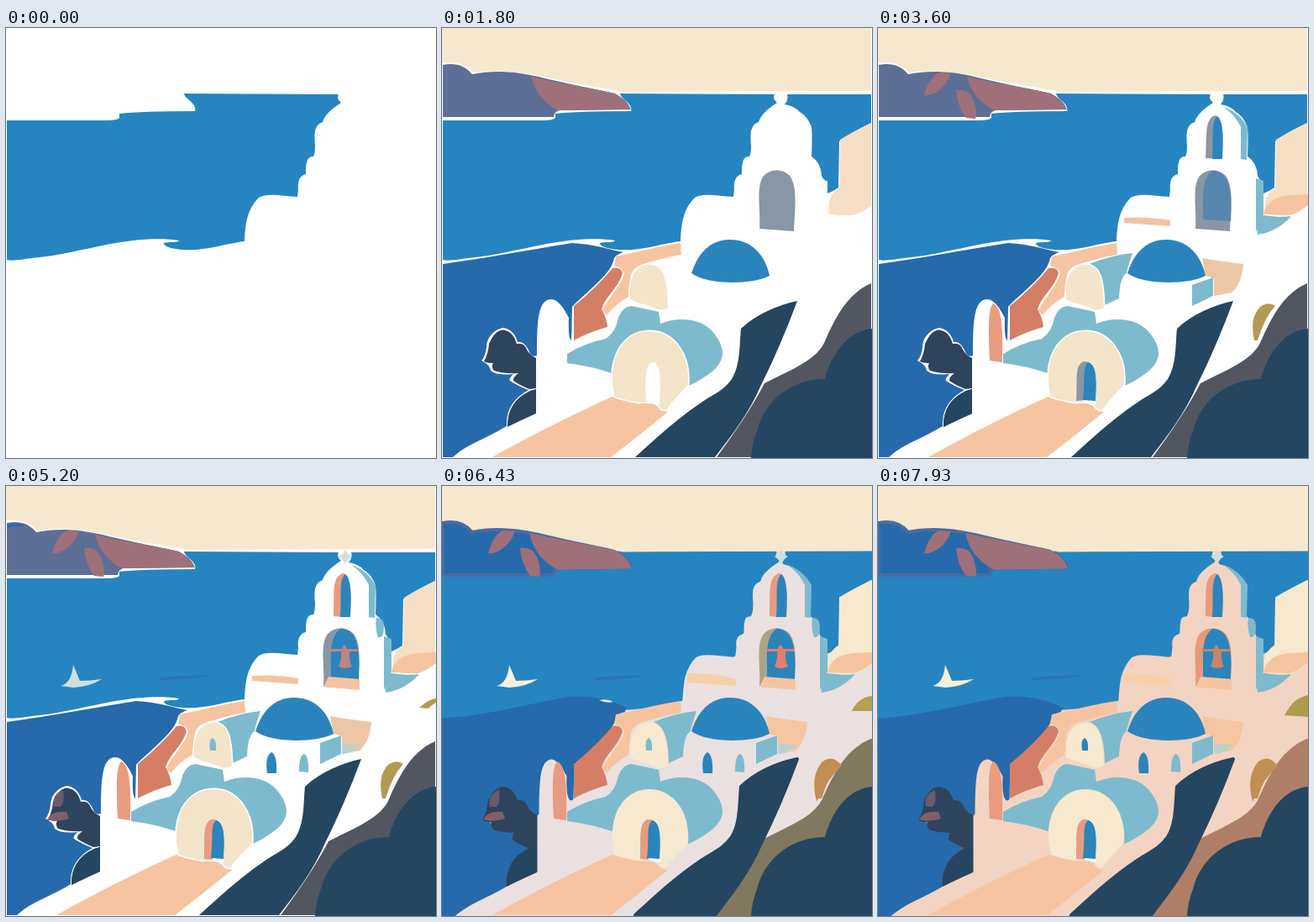
An HTML page without scripts that plays this animation: 512x512 px, repeating every 8 s.

```html
<!DOCTYPE html>
<html lang="en">
<head>
<meta charset="utf-8">
<title>Island village</title>
<style>
/* --t is the clock in ms; a piece shows from --s on, and swells by --w from --g on */
@property --t { syntax: "<number>"; inherits: true; initial-value: 0; }
@keyframes clock { to { --t: 8000; } }
html, body { margin: 0; width: 100%; height: 100%; overflow: hidden; background: #fff; }
svg { display: block; width: 100vw; height: 100vh; animation: clock 8s linear infinite; }
path, rect {
  fill: currentColor; stroke: currentColor; stroke-width: 0; stroke-linejoin: round;
  opacity: calc(var(--t) - var(--s, -9) + 1);
  animation: 8s step-end infinite;
}
.grow { stroke-width: calc(clamp(0, var(--t) - var(--g) + 1, 1) * var(--w, 5px)); }
.cut { stroke: #fff; stroke-width: 3px; stroke-opacity: calc(5330 - var(--t)); paint-order: stroke; }

.sea { color: #2685c0; }
.deep { color: #266aab; }
.blue { color: #2b84bc; }
.navy { color: #254660; }
.teal { color: #7ebace; }
.peach { color: #f6c4a0; }
.coral { color: #e99b80; }
.clay { color: #d47f65; }
.mauve { color: #9f7079; }

.base { animation-name: base; }
.isle { stroke: #4b6ba0; animation-name: isle; }
.rock { animation-name: rock; }
.wall { animation-name: wall; }
.cream { animation-name: cream; }
.arch { animation-name: arch; }
.glass { animation-name: glass; }
.ledge { animation-name: ledge; }
.shade { animation-name: shade; }
.shrub { animation-name: shrub; }
.bell { animation-name: bell; }
.sail { animation-name: sail; }
.pane { animation-name: pane; }
@keyframes base { 0% { color: #fff; } 75.375% { color: #eae0e0; } 89.125% { color: #f3d4c2; } }
@keyframes isle { 0% { color: #5d6f96; } 70.375% { color: #266aab; } }
@keyframes rock { 0% { color: #515661; } 76.625% { color: #80795f; } 90.375% { color: #ae7f66; } }
@keyframes wall { 0% { color: #f6dfc4; } 71.625% { color: #f6e9cd; } }
@keyframes cream { 0% { color: #f3e4ca; } 72.875% { color: #f6e9cf; } }
@keyframes arch { 0% { color: #8996a3; } 77.875% { color: #aea38a; } 92.875% { color: #e59a78; } }
@keyframes glass { 0% { color: #5686ae; } 62.5% { color: #2b84bc; } }
@keyframes ledge { 0% { color: #f5c3a1; } 74.125% { color: #f7d0a8; } }
@keyframes shade { 0% { color: #edc6a6; } 79.125% { color: #f5c6a0; } }
@keyframes shrub { 0% { color: #b19a54; } 80.375% { color: #c18f54; } }
@keyframes bell { 0% { color: #c08380; } 80.375% { color: #e27f70; } 94.125% { color: #c58567; } }
@keyframes sail { 0% { color: #d0e0de; } 77.875% { color: #f6f0dc; } }
@keyframes pane { 0% { color: #7ebace; } 95.375% { color: #2b84bc; } }
</style>
</head>
<body>
<svg viewBox="0 0 512 512" preserveAspectRatio="none">
  <rect class="base" width="512" height="512"/>

  <!-- water and sky -->
  <path class="sea grow" style="--g:5430" d="M1 110H120Q133 110 135 107V102Q160 99 225 99C228 90 212 84 212 78L396 79Q393 84 399 89Q380 101 377 112C366 116 367 128 368 140Q368 150 366 153C358 153 357 160 357 174C349 176 347 184 348 192L347 201C330 200 310 196 301 202C286 217 285 235 284 254C265 256 235 266 210 264C195 263 187 259 188 256C195 254 205 256 206 253C185 249 150 252 125 257C90 264 60 271 40 273C20 275 8 278 1 276Z"/>
  <path class="sea grow" style="--s:700;--g:5430" d="M411 79H511V113Q480 128 473 135L472 190Q465 195 459 197V182Q455 183 452 176Q451 160 440 153Q441 130 440 118Q435 105 426 100Q420 93 408 91Q413 85 411 79Z"/>
  <path class="grow" color="#f6e8ce" style="--s:100;--g:5330" d="M0 0H511V75L215 76C205 73 150 65 115 57C85 51 60 50 37 53C30 45 20 41 10 41H0Z"/>
  <path class="deep grow" style="--s:300;--g:5530" d="M1 281C50 274 100 265 155 256C180 257 200 264 216 267Q207 270 205 274C202 290 185 303 173 315Q158 328 155 332L154 372Q150 370 151 345C146 335 138 322 129 323C115 325 113 345 113 390Q108 392 105 388Q99 372 90 374C87 362 78 357 72 357C60 360 53 370 53 380Q52 390 47 396Q57 401 58 408Q65 414 85 412Q79 418 81 420Q90 426 103 431C85 441 76 455 77 474C55 488 30 495 13 511H1Z"/>
  <path class="deep" style="--s:5530" d="M0 277C60 272 105 259 150 251Q190 248 222 265L205 269Q150 258 0 284Z"/>
  <path color="#f0e9e2" style="--s:5530;opacity:calc((var(--t) - 5529) * (6530 - var(--t)))" d="M187 255Q197 253 204 257Q196 259 187 255Z"/>

  <!-- far island -->
  <path class="isle grow" style="--s:200;--g:5630;--w:4px" d="M1 44C15 41 27 44 36 55C60 50 85 51 115 58C150 67 190 74 205 78Q220 84 225 97L140 98Q134 99 133 106H1Z"/>
  <path class="deep" style="--s:4500" d="M2 46Q15 43 24 48Q12 47 2 50Z"/>
  <path class="mauve grow" style="--s:1000;--g:5630;--w:3px" d="M106 58C140 66 180 72 206 78Q220 86 224 97L138 98Q113 85 106 58Z"/>
  <path class="mauve" style="--s:2800" d="M55 80Q60 60 72 53L87 54Q82 68 70 76Q62 81 55 80Z"/>
  <path class="mauve" style="--s:2900" d="M93 74Q108 72 113 85Q119 100 116 108L105 107Q95 95 93 74Z"/>

  <!-- boat -->
  <path class="sail" style="--s:4600" d="M65 238Q78 235 80 213Q84 222 88 232Q100 232 114 230Q100 239 80 240Z"/>
  <path color="#2a73b1" style="--s:4700" d="M180 229Q205 225 242 226Q215 231 184 231Z"/>

  <!-- slope and rocks -->
  <path class="rock grow" style="--s:500;--g:6130;--w:6px" d="M511 304C485 315 470 340 455 375C445 395 420 405 384 423C370 450 350 480 327 511H511Z"/>
  <path class="navy grow" style="--s:400;--g:5930;--w:4px" d="M423 325C400 330 375 340 356 358C354 375 356 400 345 418C335 432 325 435 310 445C280 465 255 488 230 511H325C345 485 365 460 380 425C395 395 410 360 423 325Z"/>
  <path class="navy" style="--s:600" d="M512 358C485 360 465 385 456 418C420 418 385 440 375 480Q369 495 368 512H512Z"/>
  <path class="shrub" style="--s:3600" d="M448 372Q442 345 455 332Q465 325 473 331Q460 345 452 372Z"/>
  <path color="#c18f54" style="--s:6430" d="M446 376Q438 345 453 328Q465 319 476 333Q458 350 446 376Z"/>
  <path color="#b19a54" style="--s:5200" d="M492 264Q505 253 512 253V258Q505 262 503 265Z"/>
  <path color="#b3a052" style="--s:6330" d="M488 268Q495 252 512 250V268Z"/>
  <path color="#ad9c4e" style="--s:7530" d="M484 273Q495 252 512 249V275Z"/>

  <!-- bush -->
  <path color="#2e445d" class="grow" style="--s:1100;--g:6230;--w:3px" d="M50 397Q55 388 56 376C62 362 70 358 75 360C84 362 87 370 89 376Q98 374 101 383Q105 390 112 393V429L104 430Q90 424 85 420Q84 416 91 411Q75 412 62 408Q58 403 61 399Q54 399 50 397ZM105 432L112 430V459Q92 468 78 475Q77 445 105 432Z"/>
  <path class="navy" style="--s:1900" d="M105 432L112 430V459Q92 468 78 475Q77 445 105 432Z"/>
  <path color="#6d5a6c" style="--s:3700" d="M57 382Q54 367 68 362Q70 378 65 382Z"/>
  <path color="#805f6b" style="--s:3800" d="M49 397Q55 386 72 388L75 396Q60 401 49 397Z"/>

  <!-- right wall -->
  <path class="wall grow" style="--s:1200;--g:5730;--w:2px" d="M511 113Q485 126 474 133L473 190Q462 197 461 208L460 221Q475 224 490 223Q505 218 511 211Z"/>
  <path class="peach" style="--s:2000" d="M459 222Q462 202 490 199L512 198V211Q497 222 490 223Z"/>
  <path class="teal" style="--s:2100" d="M450 222L460 223Q480 226 492 224Q475 243 452 246Z"/>
  <path class="teal" style="--s:2200" d="M450 179L459 182V221L450 243Z"/>

  <!-- bell tower -->
  <path class="arch" style="--s:1300" d="M378 239C380 215 373 190 383 176C392 167 405 167 414 176C424 190 420 215 419 242Z"/>
  <path class="glass" style="--s:3200" d="M387 228C388 205 383 182 398 170C416 169 423 190 420 230Z"/>
  <path class="peach" style="--s:4000" d="M384 227L421 230V243L378 239Z"/>
  <path class="bell" style="--s:5000" d="M386 194H400Q403 185 406 194H420V197H409Q408 208 412 215Q403 219 396 215Q400 205 399 197H386Z"/>
  <path color="#8996a3" style="--s:2300" d="M390 155C392 130 388 107 402 104C412 108 411 130 410 156Z"/>
  <path class="coral" style="--s:3900" d="M390 155C392 130 386 108 402 104C412 108 411 140 410 156Z"/>
  <path class="blue" style="--s:3100" d="M398 156C400 130 396 112 404 105C412 112 411 135 410 156Z"/>
  <path class="teal" style="--s:3000" d="M411 94Q430 100 440 118L439 157L432 156V118Q425 103 411 94Z"/>
  <path class="teal" style="--s:4900" d="M441 157Q450 156 450 168Q450 182 443 180Q439 168 441 157Z"/>
  <path color="#cfe0db" style="--s:4800" d="M396 84Q401 82 404 76Q407 82 412 84Q406 87 404 93Q401 87 396 84Z"/>

  <!-- middle houses -->
  <path class="ledge" style="--s:2400" d="M293 226Q320 224 348 229V236L293 232Z"/>
  <path color="#f7d0a8" style="--s:6330" d="M293 223Q325 222 350 230V238L292 234Z"/>
  <path class="peach" style="--s:1700" d="M284 256C255 260 230 268 207 272L205 283Q215 286 217 292C215 305 195 325 191 337L196 342Q205 330 222 320L224 300Q225 285 240 281Q270 272 285 270Z"/>
  <path class="clay" style="--s:1800" d="M157 331Q185 308 203 286Q213 284 215 292C210 310 195 318 190 335Q196 345 197 356Q175 362 157 372Z"/>
  <path class="shade" style="--s:2500" d="M386 274Q415 279 435 281Q433 305 421 315L400 319V298L390 295Z"/>
  <path color="#bcd0cc" style="--s:5100" d="M400 307L422 308Q415 318 400 319Z"/>
  <path class="teal" style="--s:2600" d="M252 281Q275 271 303 268Q297 285 296 292Q288 296 287 322L270 330C270 305 265 285 252 281Z"/>
  <path class="blue" style="--s:800" d="M297 292C305 267 320 252 343 252C370 252 385 272 390 295C370 306 315 306 297 292Z"/>
  <path class="teal" style="--s:3300" d="M374 306L399 297V319L374 331Z"/>
  <path class="blue" style="--s:4200" d="M311 342Q308 322 316 317Q323 320 322 342Z"/>
  <path class="teal" style="--s:4200" d="M349 340Q349 320 355 319Q361 322 360 341Z"/>

  <!-- front houses -->
  <path class="peach" style="--s:900" d="M60 511C110 483 160 458 203 439Q225 446 240 447Q255 445 260 455L269 457Q235 485 201 511Z"/>
  <path class="teal" style="--s:1500" d="M149 388Q170 375 195 370Q207 362 210 345Q215 332 225 331Q245 335 258 338L260 352C280 344 310 344 325 365C340 385 336 400 315 414Q300 424 293 426L202 411Q175 402 149 399Z"/>
  <path class="cream cut" style="--s:1600" d="M224 323C222 295 232 282 248 282C265 283 268 300 269 333Q260 338 253 333Q235 328 224 323Z"/>
  <path class="pane" style="--s:4300" d="M243 315Q241 302 246 300Q251 302 250 315Z"/>
  <path class="cream cut" style="--s:1400" d="M206 439C195 395 215 361 247 361C275 361 296 388 293 425Q283 435 270 450Q266 460 258 449Q250 443 235 446Q218 443 206 439Z"/>
  <path color="#fff" style="--s:1400" d="M243 444C241 415 243 398 252 398C262 400 260 425 259 448Z"/>
  <path color="#8996a3" style="--s:3400" d="M236 444C238 420 233 402 245 397Q250 397 253 400C243 410 247 430 246 443Z"/>
  <path class="coral" style="--s:4100" d="M236 444C238 420 233 402 245 397Q250 397 253 400C243 410 247 430 246 445Z"/>
  <path class="blue" style="--s:3500" d="M244 443C247 420 243 405 250 398C262 400 260 425 259 444Z"/>
  <path class="coral" style="--s:2700" d="M133 396C132 370 130 335 137 328C148 332 149 360 148 398Z"/>
</svg>
</body>
</html>
```
